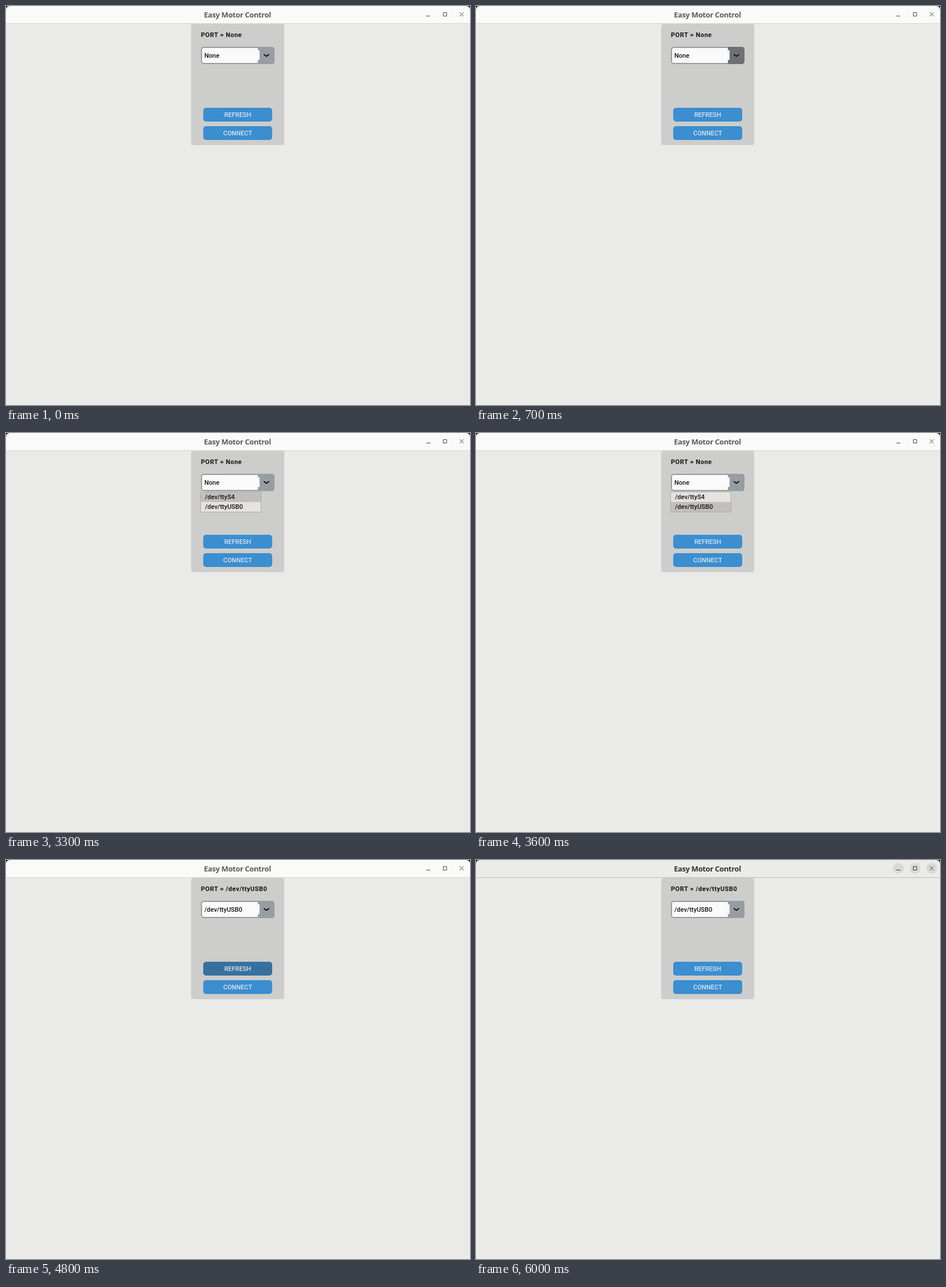
Recreate the animation shown at these times as an HTML page. Size 807 by 694 pixels, loop 8 s.

```html
<!DOCTYPE html>
<html lang="en">
<head>
<meta charset="utf-8">
<title>Easy Motor Control</title>
<style>
  html, body { margin: 0; width: 100%; height: 100%; overflow: hidden; background: #eaeae8; }
  svg { display: block; width: 807px; height: 694px; }
  text { font: 500 11px Roboto, Arial, sans-serif; fill: #141414; }
  #title { font: 700 13px "Open Sans", "Noto Sans", sans-serif; letter-spacing: -.4px; text-anchor: middle; fill: #5c5c5a; }
  #port { font-weight: 700; letter-spacing: .5px; }
  .btn rect { fill: #3b8ed0; }
  .btn.hover rect { fill: #36719f; }
  .btn text { fill: #dce4ee; text-anchor: middle; }
  #bar { fill: #fafaf8; }
  #edge { fill: #d6d5d2; }
  #arrow { fill: #979da2; }
  #arrow.hover { fill: #6e7174; }
  #icons { fill: none; stroke: #4c4c4a; }
  #discs { fill: #dad9d7; visibility: hidden; }
  .focus #bar { fill: #ebebe9; }
  .focus #edge { fill: #bfbebb; }
  .focus #title { fill: #333331; }
  .focus #icons { stroke: #333331; }
  .focus #discs { visibility: visible; }
  .row { fill: #e4e3e1; }
  .row.hover { fill: #c0bfbd; }
</style>
</head>
<body>
<svg id="win" viewBox="0 0 807 694" xml:space="preserve">
  <rect width="807" height="694" fill="#eaeae8"/>
  <rect width="807" height="12" fill="#161616"/>
  <path id="bar" d="M0 30V7Q0 0 7 0H800Q807 0 807 7V30Z"/>
  <rect id="edge" y="30" width="807" height="1"/>
  <text id="title" x="402.5" y="20">Easy Motor Control</text>
  <g id="discs">
    <circle cx="734.5" cy="14.5" r="9.5"/>
    <circle cx="763.5" cy="14.5" r="9.5"/>
    <circle cx="792.5" cy="14.5" r="9.5"/>
  </g>
  <path id="icons" d="M731 17.5H738M760.5 11.5H766.5V17.5H760.5ZM789 11L796 18M796 11L789 18"/>

  <rect x="322" y="31" width="162" height="211" fill="#dbdbd9"/>
  <rect x="322" y="31" width="162" height="211" rx="6" fill="#cdcdcb"/>
  <text id="port" x="339" y="54"></text>

  <rect x="339" y="71" width="110" height="30" rx="5" fill="#979da2"/>
  <path id="arrow" d="M438 71H462Q467 71 467 76V96Q467 101 462 101H438Z"/>
  <path d="M438 73H344Q341 73 341 76V96Q341 99 344 99H438V94H441V77H438Z" fill="#f9faf9"/>
  <path d="M449 84.5L453 87.5L457 84.5" fill="none" stroke="#111" stroke-width="2" stroke-linecap="round" stroke-linejoin="round"/>
  <text id="entry" x="345" y="90"></text>

  <g id="menu">
    <rect x="338" y="102" width="106" height="36" fill="#acabaa"/>
    <rect id="row1" class="row" x="339" y="103" width="104" height="17"/>
    <rect id="row2" class="row" x="339" y="120" width="104" height="17"/>
    <text x="346" y="115">/dev/ttyS4</text>
    <text x="346" y="132">/dev/ttyUSB0</text>
  </g>

  <g id="refresh" class="btn">
    <rect x="343" y="177" width="120" height="24" rx="5"/>
    <text x="403" y="193">REFRESH</text>
  </g>
  <g id="connect" class="btn">
    <rect x="343" y="209" width="120" height="24" rx="5"/>
    <text x="403" y="225">CONNECT</text>
  </g>
</svg>
<script>
  const LOOP = 8000;
  const $ = id => document.getElementById(id);
  const hoverable = ["arrow", "row1", "row2", "refresh", "connect"];

  // Start time in ms, hovered part, open menu, chosen port, focused window
  const steps = [
    [0, "", false, "None", false],
    [100, "connect", false, "None", false],
    [200, "", false, "None", false],
    [700, "arrow", false, "None", false],
    [1700, "", true, "None", false],
    [3300, "row1", true, "None", false],
    [3600, "row2", true, "None", false],
    [4200, "", false, "/dev/ttyUSB0", false],
    [4800, "refresh", false, "/dev/ttyUSB0", false],
    [4900, "", false, "/dev/ttyUSB0", false],
    [5000, "connect", false, "/dev/ttyUSB0", false],
    [6000, "", false, "/dev/ttyUSB0", true]
  ];

  let shown;
  function show(step) {
    if (step === shown) return;
    shown = step;
    const [, hover, open, port, focus] = step;
    for (const id of hoverable) $(id).classList.toggle("hover", id === hover);
    $("menu").style.display = open ? "" : "none";
    $("port").textContent = "PORT = " + port;
    $("entry").textContent = port;
    $("win").classList.toggle("focus", focus);
  }

  const start = performance.now();
  function tick(now) {
    const t = Math.max(0, now - start) % LOOP;
    show(steps.findLast(s => s[0] <= t));
    requestAnimationFrame(tick);
  }
  show(steps[0]);
  requestAnimationFrame(tick);
</script>
</body>
</html>
```
